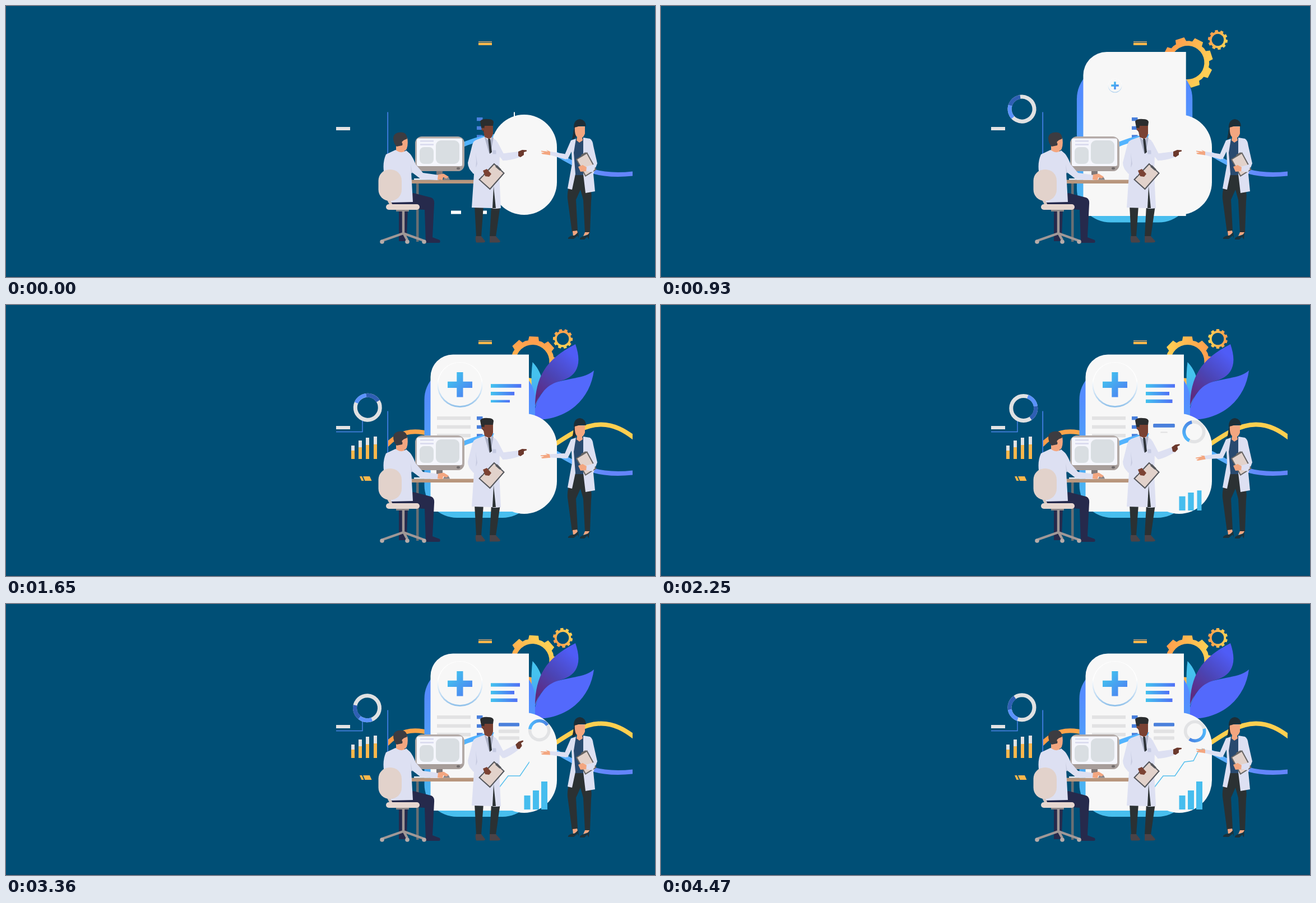
These frames come from a looping animation (1158x484 px, 4.5 s). An HTML page:

```html
<!DOCTYPE html>
<html lang="en">
<head>
<meta charset="utf-8">
<title>Medical team</title>
<style>
html, body { margin: 0; width: 100%; height: 100%; overflow: hidden; background: #004f76; }
svg { display: block; width: 1158px; height: 484px; }
.coat { fill: #dde0f2; }
.light { fill: #f7f7f7; }
.grey { fill: #e2e2e3; }
.blue { fill: #4a80dc; }
.navy { fill: #262a4c; }
.dark { fill: #2b3133; }
.skin { fill: #f3a680; }
.brown { fill: #7b4233; }
.sand { fill: #e2d2cb; }
.amber { fill: #fdb74b; }
.sky { fill: #46bdee; }
</style>
</head>
<body>
<svg viewBox="0 0 1158 484">
<defs>
  <linearGradient id="gold"><stop offset=".1" stop-color="#ff9f4d"/><stop offset=".9" stop-color="#ffcf54"/></linearGradient>
  <linearGradient id="dawn" gradientUnits="userSpaceOnUse" x1="681" x2="1118" y1="0" y2="0"><stop offset="0" stop-color="#ff9c49"/><stop offset=".7" stop-color="#ffcf50"/></linearGradient>
  <linearGradient id="stream" gradientUnits="userSpaceOnUse" x1="720" x2="1118" y1="0" y2="0"><stop offset="0" stop-color="#4fb6ff"/><stop offset=".7" stop-color="#5ab0ff"/><stop offset=".88" stop-color="#6485fb"/></linearGradient>
  <linearGradient id="back" x2="0" y2="1"><stop offset=".2" stop-color="#548cff"/><stop offset="1" stop-color="#48c0ee"/></linearGradient>
  <linearGradient id="leaf" x2="0" y2="1"><stop offset=".3" stop-color="#45c2ee"/><stop offset="1" stop-color="#4f92f8"/></linearGradient>
  <linearGradient id="bar"><stop offset="0" stop-color="#42c2ee"/><stop offset="1" stop-color="#5070f6"/></linearGradient>
  <linearGradient id="cross" x2="1" y2="1"><stop offset=".15" stop-color="#42c0ee"/><stop offset=".85" stop-color="#4d86f2"/></linearGradient>
  <linearGradient id="rim" x2="0" y2="1"><stop offset=".4" stop-color="#fff"/><stop offset="1" stop-color="#8fc0ea"/></linearGradient>
  <linearGradient id="plum" x1=".8" x2=".2" y2="1"><stop offset=".1" stop-color="#4f5cf6"/><stop offset=".55" stop-color="#4b44b4"/><stop offset=".95" stop-color="#5f2a80"/></linearGradient>
  <linearGradient id="arc" x1="0" x2="1"><stop offset="0" stop-color="#4a7cdf"/><stop offset="1" stop-color="#4fb6fb"/></linearGradient>
  <clipPath id="edge"><rect x="681" y="150" width="437" height="200"/></clipPath>
  <clipPath id="wipe"><rect id="reveal" x="878" y="240" width="0" height="100"/></clipPath>
</defs>
<rect width="1158" height="484" fill="#004f76"/>
<rect y="482.5" width="1158" height="1.5" fill="#08486a"/>

<!-- floating details -->
<path class="amber" d="M843 65.5h24v4.5h-24z"/><path fill="#d9a874" d="M843 63h24v1.2h-24z"/>
<path class="grey" d="M589 216h25v6h-25z"/>
<path fill="#fff" d="M794 365.500h18v6h-18zM849 365.500h9v6h-9zM906 189.500h2v12h-2z"/>
<g data-pop="1080 900 230"><path clip-path="url(#edge)" fill="none" stroke="url(#dawn)" stroke-width="8" d="M672 258C700 225 725 221 760 231C850 250 900 300 960 262C1000 235 1030 213 1062 213.500C1085 214 1103 223 1124 240"/></g>
<path data-pop="1120 613 222" fill="none" stroke="#4a82e6" stroke-width="1.500" d="M589 226.500H636V204"/>
<path fill="none" stroke="#4a82ee" stroke-width="1.600" d="M681.200 189.500V268"/>
<g id="columns"></g>
<path data-pop="1110 642 310" class="amber" d="M631 306h4l3.500 8h-4zM637 306h12l3.500 8h-12z"/>
<g data-pop="30 645 185"><g id="dial" fill="none" stroke-width="7">
  <circle r="22" stroke="#e0e1e2"/>
  <circle r="22" pathLength="360" stroke="#2f5fb4" stroke-dasharray="65 295" transform="rotate(170)"/>
  <circle r="22" pathLength="360" stroke="#5a92fb" stroke-dasharray="60 300" transform="rotate(110)"/>
</g></g>
<g data-pop="30 939.500 101"><path id="bigGear" fill="url(#gold)" fill-rule="evenodd"/></g>
<g data-pop="30 993.500 60.500"><path id="smallGear" fill="url(#gold)" fill-rule="evenodd"/></g>
<g data-pop="1000 944 200">
  <path fill="url(#leaf)" d="M939.500 102C955 118 961 140 955 156L944 182C937 160 936 130 939.500 102Z"/>
  <path fill="url(#plum)" d="M944 180C945 130 962 97 1016 70C1030 110 1016 130 985 137C965 145 952 158 944 180Z"/>
  <path fill="#5369fc" d="M940 205C946 160 965 143 985 137C1010 130 1035 130 1049 117C1043 165 1005 207 940 205Z"/>
</g>

<!-- document -->
<g data-pop="570 849 233">
  <rect x="746.500" y="111" width="197.500" height="269" rx="58" fill="url(#back)"/>
  <path class="light" d="M757.500 369V128.500A40 40 0 0 1 797.500 88.500H933V369Z"/>
</g>
<g data-pop="885 810 142">
  <circle cx="810" cy="142.500" r="40.500" fill="url(#rim)"/><circle cx="810" cy="141.500" r="38.700" class="light"/>
  <path fill="url(#cross)" d="M804.300 120h11.200v16.700H832v11.200h-16.500v16.600h-11.200v-16.600H788v-11.200h16.300z"/>
</g>
<g id="heading"></g>
<g id="rows"></g>
<path class="blue" d="M840 199h10.500v6.200h-10.500zM840 214.800h10.500v6.200h-10.500zM840 230.300h10.500v6.200h-10.500z"/>
<g clip-path="url(#edge)"><path fill="none" stroke="url(#stream)" stroke-width="8" d="M722 292C760 290 785 259 822 245C900 215 935 246 983 265C1020 285 1050 308 1122 299"/></g>
<rect class="light" x="866" y="194" width="117" height="179" rx="58.500"/>
<g id="notes"></g>
<g id="chart"></g>
<g data-pop="1900 952 226.500"><g id="gauge" fill="none" stroke-width="5.600">
  <circle r="17" stroke="#e2e3e5"/>
  <circle r="17" pathLength="360" stroke="url(#arc)" stroke-dasharray="140 220" transform="rotate(115)"/>
</g></g>
<path clip-path="url(#wipe)" fill="none" stroke="#55bfee" stroke-width="1.500" d="M879 329L896 307H917L934 282L950 280L960 261L970 259"/>

<!-- desk -->
<path fill="#6a6f73" d="M732 316h4.500v105h-4.500z"/>
<path fill="#7f7878" d="M768 294h11v9h-11z"/>
<rect x="730" y="233" width="88" height="62" rx="12" fill="#b3aaa7"/>
<path fill="#a79d9a" d="M731 286h86q-2 9-11 9h-64q-9 0-11-9z"/>
<rect x="733" y="236.500" width="81" height="49.500" rx="3" fill="#f5f6fc"/>
<ellipse cx="807" cy="290" rx="3" ry="2.200" fill="#716b6b"/>
<path fill="#dcddef" d="M739 239.800h24v3h-24zM739 246h24v3h-24z"/>
<rect x="738" y="252" width="25" height="30" rx="8" fill="#d9dee2"/>
<rect x="767" y="240" width="42" height="42" rx="9" fill="#d9dee2"/>
<path fill="#b8967d" d="M722 310.500h114v6.500h-114z"/>
<path fill="#f3f3f8" d="M728 308h45v2.500h-45z"/>
<path fill="#8d8687" d="M780 310.500q2-7 8-6q3 2 4 6z"/>

<!-- seated figure -->
<path class="navy" d="M701 362h16l-2 50 4 8h-18z"/>
<path class="navy" d="M686 349L727 334L758 342Q765 344 764 354L761 413L774 418Q776 423 772 423H749L747 364L688 360Z"/>
<path class="skin" d="M696 246L706 236L716 235Q718 247 715 255Q714 258 711 258.500L713 264L696 262Z"/>
<path fill="#3d3c41" d="M691 235Q692 226 704 225.500Q715 225 716 237L709 240L707 249L697 251Q691 245 691 235Z"/>
<circle class="skin" cx="709" cy="243.500" r="2.500"/>
<path class="coat" d="M695 257Q706 265 714 258L721 264Q726 270 731 283L744 298L772 302L770 311L740 309L723 296L726 350L685 351L674 295Q672 278 678 265Z"/>
<path fill="#c8cbe0" d="M722 282l3 17-2-1z"/>
<path class="skin" d="M771 301L781 299.500L790 305L786 308L780 306L779 311L770 310Z"/>
<path fill="none" stroke="#d8c7c1" stroke-width="5" d="M682 345L688 357"/>
<rect class="sand" x="664.500" y="292" width="41.500" height="56" rx="20"/>
<rect x="678" y="354" width="60" height="10" rx="5" fill="#e6d6cf"/>
<path fill="#8b8586" d="M696 364h23v3h-23z"/>
<path fill="none" stroke="#a09897" stroke-width="4.500" d="M709 366V406M709 406L672 419M709 406L745 419M709 405L716 418"/>
<g fill="#b7aca9"><circle cx="671" cy="421" r="3.800"/><circle cx="716" cy="421" r="3.800"/><circle cx="746" cy="421" r="3.800"/></g>

<!-- standing man -->
<path class="dark" d="M836 356h16l-4 56h-9zM866 356h16l-8 56h-11z"/>
<path fill="#4a4347" d="M838 411h10l7 9q0 2.500-4 2.500h-12q-2-5-1-11.500zM863 411h11l8 9q0 2.500-5 2.500h-14z"/>
<path class="coat" d="M853 234L866 234L875 240L881 264L880 300L883 361Q870 363 867 361L831 360L835 300Q824 291 824 280L832 248Q834 240 842 238Z"/>
<path fill="#c7cbe1" d="M838 262l3 20-3 8 1-13z"/>
<path class="dark" d="M870 322l4 39h-6z"/>
<path fill="#aeb3c8" d="M854 235l8 28 3-2 5-26z"/>
<path fill="#eceefa" d="M855 234h11l-1 5-3 3z"/>
<path fill="#2e3339" d="M860 237l4 0 3 24-4 3z"/>
<path fill="#c5cae2" d="M868.500 257.500h6v7h-6z"/>
<path class="brown" d="M850 214L869 212L869 228Q867 237 861 237L854 234Z"/>
<path fill="#2b2d2e" d="M846 206Q849 201 860 202Q869 202 870 207L869 214L854 214L852 225L848 217Z"/>
<circle class="brown" cx="851" cy="220" r="2.500"/>
<path fill="#e2d2cb" stroke="#55575c" stroke-width="2" d="M871 282L888.500 298.500L863.500 327L844.500 310Z"/>
<path fill="#55575c" d="M876 284l8 8 -3 2-8-7z"/>
<path class="coat" d="M826 282L850 293L851 303L833 299Z"/>
<path class="brown" d="M851 294L858 291L866 300L862 305L855 304Z"/>
<path class="coat" d="M869 237L877 243L888 264L887 276L876 264Z"/>
<g id="pointer">
  <path class="coat" d="M882 264L914 260L917 270Q900 276 886 276Z"/>
  <path fill="#6b382c" d="M914 260L921 257L929 257.500L929 259.500L924 261L924 266L918 270L914 268Z"/>
</g>

<!-- standing woman -->
<path class="dark" d="M1010 300H1032L1042 322Q1046 333 1044 348L1042 405H1033L1030 346L1025 328L1017 346L1020 401L1010 404L1002 344Q1001 331 1006 318Z"/>
<path class="skin" d="M1011 402l8-1 1 4-8 7zM1033 404h8l-2 4-9 3z"/>
<path fill="#1c323b" d="M1021 403l1 12-2-5-7 6h-10q-1-4 8-6 6 1 10-7zM1041 405l-1 12-3-5-5 5h-8q-1-4 7-6 6 0 10-6z"/>
<path fill="#1e2f38" d="M1017 212Q1012 220 1012 228L1010 238Q1018 236 1019 226Z"/>
<path fill="#294a6f" d="M1012 240L1031 236L1033 302H1012Z"/>
<path class="skin" d="M1015 215H1033L1033 228Q1030 235 1028 235L1029 240L1023 244L1018 240L1019 234Q1014 230 1015 215Z"/>
<path fill="#1d2e37" d="M1013 215Q1014 203 1024 202Q1034 203 1035 215Q1025 212 1013 218Z"/>
<path class="coat" d="M1017 237L1013 262L1016 300L1010 328L1002 326L1010 282L1009 260L1002 274L995 270L1008 240Z"/>
<path class="coat" d="M1030 235L1042 237Q1047 240 1048 250L1055 281L1048 300L1051 331L1034 334L1030 300Z"/>
<path fill="#e2d2cb" stroke="#686665" stroke-width="2" d="M1036.500 262.500L1052.500 292L1034 303.500L1018 274Z"/>
<path fill="#686665" d="M1026 266l8-5 1.500 3-8 5z"/>
<path class="coat" d="M1055 280L1047 297L1036 295L1034 287L1046 284Z"/>
<path class="skin" d="M1021 287L1029 284L1036 288L1035 295L1025 296Z"/>
<g id="offer">
  <path class="coat" d="M971 260L996 264L1004 267L999 274Q985 270 970 266Z"/>
  <path class="skin" d="M971 260L964 257L967 260L955 258.500L955 260L961 261.500L955 262.500L957 264.500L965 265.500L971 266.500Z"/>
</g>
</svg>
<script>
const LOOP = 4500, POP = 540;
const $ = id => document.getElementById(id);
const rect = (x, y, w, h, attrs) => `<rect x="${x}" y="${y}" width="${w}" height="${h}" ${attrs}/>`;
const popRect = (start, ox, oy, ...box) => `<g data-pop="${start} ${ox} ${oy}">${rect(...box)}</g>`;

function gearPath(teeth, outer, root, hole) {
  const step = 2 * Math.PI / teeth, points = [];
  for (let i = 0; i < teeth; i++) {
    for (const [k, r] of [[-.32, root], [-.23, outer], [.23, outer], [.32, root], [.5, root * 1.01]]) {
      const a = (i + k) * step;
      points.push((r * Math.sin(a)).toFixed(2) + ' ' + (-r * Math.cos(a)).toFixed(2));
    }
  }
  return `M${points.join('L')}ZM${hole} 0A${hole} ${hole} 0 1 0 ${-hole} 0A${hole} ${hole} 0 1 0 ${hole} 0Z`;
}
$('bigGear').setAttribute('d', gearPath(8, 45.5, 38.5, 30));
$('smallGear').setAttribute('d', gearPath(10, 17.7, 14.6, 10.8));

// x, top, start of the amber part
$('columns').innerHTML = [[616, 251, 260], [629, 242, 254], [642, 237, 250], [656, 235, 249]].map(([x, top, mid], i) =>
  `<g data-pop="${1080 + i * 20} ${x + 3} 275">${rect(x, top, 6, mid - top, 'class="grey"')}${rect(x, mid, 6, 275 - mid, 'class="amber"')}</g>`).join('');
$('heading').innerHTML = [[1300, 52], [1390, 42], [1520, 47.5]].map(([start, w], i) =>
  popRect(start, 865, 144.5 + i * 13.7, 865, 141.3 + i * 13.7, w, 6.3, 'fill="url(#bar)"')).join('');
$('rows').innerHTML = [0, 1, 2].map(i =>
  popRect(1000 + i * 50, 799, 202 + i * 15.6, 769, 199 + i * 15.6, 60, 6.2, 'class="grey"')).join('');
$('notes').innerHTML = [[1900, 'blue'], [2200, 'grey'], [2310, 'grey']].map(([start, tone], i) =>
  popRect(start, 897.5, 215.4 + i * 12, 879, 212.2 + i * 12, 37, 6.4, `rx="1.5" class="${tone}"`)).join('');
$('chart').innerHTML = [[1980, 924.5, 342], [2035, 940, 333], [2120, 955, 317]].map(([start, x, y]) =>
  popRect(start, x + 5.5, 367, x, y, 11, 367 - y, 'class="sky"')).join('');

const pops = [...document.querySelectorAll('[data-pop]')].map(el => {
  const [start, x, y] = el.dataset.pop.split(' ').map(Number);
  return { el, start, x, y };
});

const clamp = v => Math.min(1, Math.max(0, v));
const progress = (t, start, length) => clamp((t - start) / length);
const overshoot = p => p <= 0 ? 0 : 1 + 2.1 * (p - 1) ** 3 + 1.1 * (p - 1) ** 2;
const easeInOut = (p, power) => p < .5 ? (2 * p) ** power / 2 : 1 - (2 - 2 * p) ** power / 2;
const bump = (t, start, length) => Math.sin(Math.PI * progress(t, start, length));
const move = (id, value) => $(id).setAttribute('transform', value);

function draw(t) {
  for (const { el, start, x, y } of pops) {
    const s = overshoot(progress(t, start, POP));
    el.setAttribute('visibility', s ? 'visible' : 'hidden');
    el.setAttribute('transform', `translate(${x} ${y}) scale(${s}) translate(${-x} ${-y})`);
  }
  const turn = 360 * easeInOut(progress(t, 30, 4440), 2.1);
  move('bigGear', `translate(939.5 101) rotate(${turn})`);
  move('smallGear', `translate(993.5 60.5) rotate(${turn})`);
  move('dial', `translate(645.4 184.6) rotate(${turn}) translate(-1.4 .2)`);
  const sweep = 360 * easeInOut(progress(t, 2000, 4300), 2);
  move('gauge', `translate(952 226.5) rotate(${sweep}) translate(-1 0)`);
  $('reveal').setAttribute('width', 95 * easeInOut(progress(t, 3000, 660), 2));
  move('pointer', `rotate(${-21 * bump(t, 1650, 2850)} 886 269)`);
  move('offer', `rotate(${-18 * bump(t, 1000, 2650)} 1000 269)`);
}

function tick(now) {
  draw(Math.floor(now % LOOP / 30) * 30);
  requestAnimationFrame(tick);
}
draw(0);
requestAnimationFrame(tick);
</script>
</body>
</html>
```
